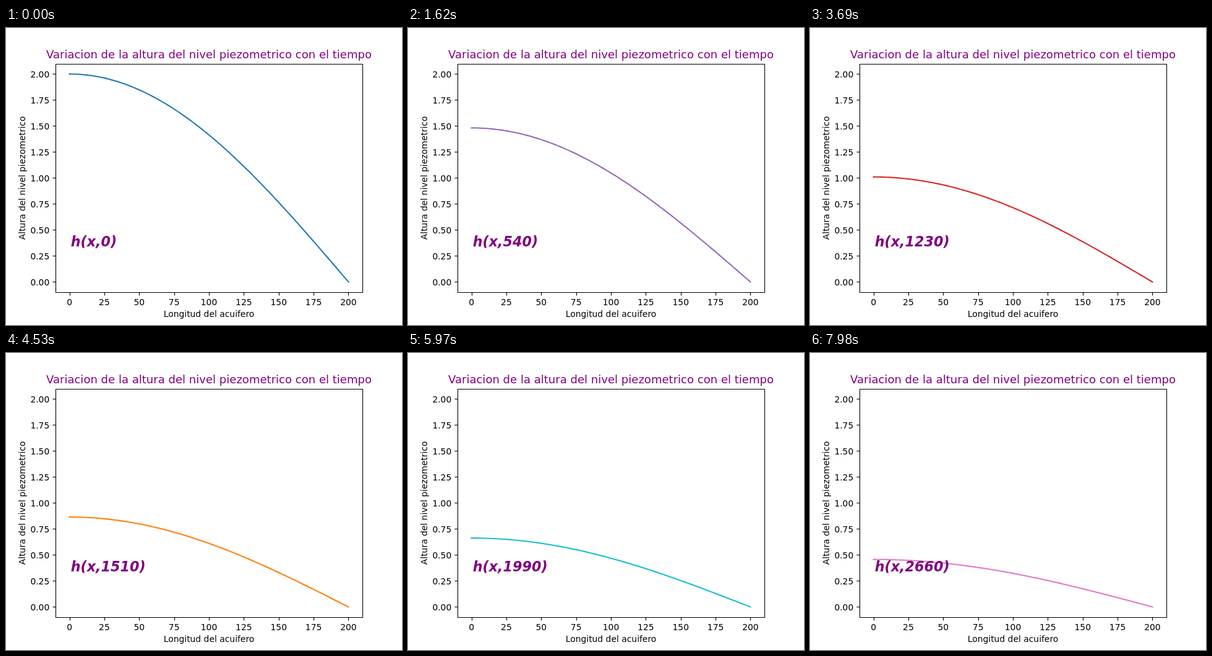
Write an HTML page with a canvas that moves like this. It is 640 px wide and 480 px high and loops after 8000 ms.

```html
<!DOCTYPE html>
<html lang="es">
<head>
<meta charset="utf-8">
<title>Nivel piezometrico</title>
<style>
  html, body { margin: 0; width: 100%; height: 100%; overflow: hidden; background: #fff; }
  canvas { display: block; }
</style>
</head>
<body>
<canvas id="plot" width="640" height="480"></canvas>
<script>
const ctx = document.getElementById('plot').getContext('2d');
const LOOP_MS = 8000, STEP_MS = 30, SECONDS_PER_STEP = 10;
const LENGTH = 200, INITIAL_HEIGHT = 2, DIFFUSIVITY = 9;
const WAVE = Math.PI / (2 * LENGTH);
const PT = 100 / 72;
const FAMILY = '"DejaVu Sans", sans-serif';
const COLORS = ['#1f77b4', '#ff7f0e', '#2ca02c', '#d62728', '#9467bd',
                '#8c564b', '#e377c2', '#7f7f7f', '#bcbd22', '#17becf'];
const box = { left: 80.5, top: 58.5, right: 576.5, bottom: 427.5 };

const toX = x => 102.545 + x * 2.25455;
const toY = h => 410.4 - h * 168;
const snap = v => Math.floor(v + 0.5) + 0.5;

function text(str, x, y, { size = 10, align = 'center', color = '#000', style = '' } = {}) {
  ctx.font = `${style} ${size * PT}px ${FAMILY}`;
  ctx.textAlign = align;
  ctx.fillStyle = color;
  ctx.fillText(str, x, y);
}

function line(x1, y1, x2, y2) {
  ctx.beginPath();
  ctx.moveTo(x1, y1);
  ctx.lineTo(x2, y2);
  ctx.stroke();
}

function drawAxes() {
  ctx.strokeStyle = '#000';
  ctx.lineWidth = 0.8 * PT;
  ctx.lineCap = 'butt';
  for (let i = 0; i <= 8; i++) {
    const x = toX(i * 25), y = toY(i / 4);
    line(snap(x), box.bottom, snap(x), box.bottom + 5);
    line(box.left, snap(y), box.left - 5, snap(y));
    text(i * 25, x, 448);
    text((i / 4).toFixed(2), 70.28, Math.round(y + 5.28), { align: 'right' });
  }
  ctx.strokeRect(box.left, box.top, box.right - box.left, box.bottom - box.top);

  text('Variacion de la altura del nivel piezometrico con el tiempo', 328, 49,
       { size: 13, color: 'purple' });
  text('Longitud del acuifero', 328, 467);
  ctx.save();
  ctx.translate(31, 242.4);
  ctx.rotate(-Math.PI / 2);
  text('Altura del nivel piezometrico', 0, 0);
  ctx.restore();
}

function drawCurve(step) {
  const peak = INITIAL_HEIGHT * Math.exp(-DIFFUSIVITY * WAVE ** 2 * step * SECONDS_PER_STEP);
  ctx.strokeStyle = COLORS[step % COLORS.length];
  ctx.lineWidth = 1.5 * PT;
  ctx.lineCap = 'square';
  ctx.lineJoin = 'round';
  ctx.beginPath();
  for (let x = 0; x <= LENGTH; x += 2) ctx.lineTo(toX(x), toY(peak * Math.cos(WAVE * x)));
  ctx.stroke();
}

function draw(now) {
  const step = Math.floor((now % LOOP_MS) / STEP_MS);
  ctx.fillStyle = '#fff';
  ctx.fillRect(0, 0, 640, 480);
  drawCurve(step);
  drawAxes();
  text(`h(x,${step * SECONDS_PER_STEP})`, 104.8, 353,
       { size: 16, align: 'left', color: 'purple', style: 'italic bold' });
}

const start = performance.now();
function tick() {
  draw(performance.now() - start);
  requestAnimationFrame(tick);
}
tick();
</script>
</body>
</html>
```
